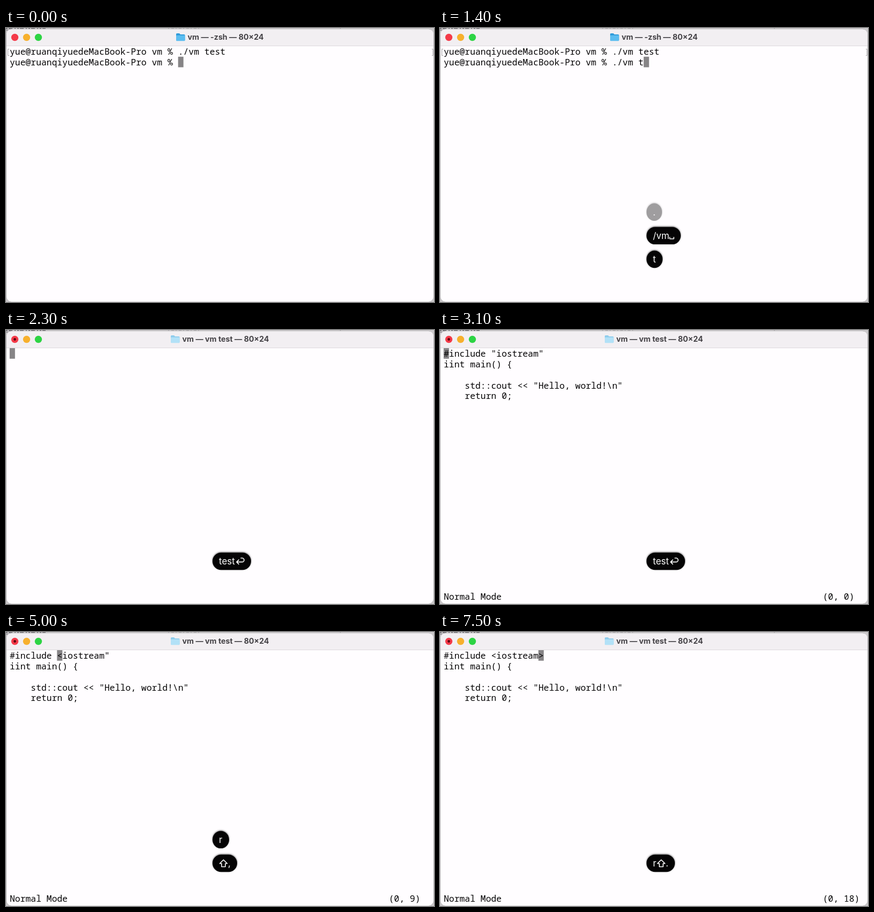
Write an HTML page that moves like this. It is 800 px wide and 513 px high and loops after 8000 ms.

```html
<!DOCTYPE html>
<html lang="en">
<head>
<meta charset="utf-8">
<title>Terminal</title>
<style>
  html, body { margin: 0; width: 100%; height: 100%; overflow: hidden; background: #fffdff; }
  svg { display: block; width: 100%; height: 100%; }
  text { white-space: pre; }
  .term { font: 16.4px "Noto Sans Mono", monospace; fill: #050405; }
  .title { font: 700 14.25px Inter, sans-serif; fill: #444246; }
  .pill { filter: drop-shadow(0 -1px 1.8px rgba(0, 0, 0, .55)); }
  .pill rect { fill: #050405; }
  .pill text { font: 17px Inter, sans-serif; fill: #fff; }
  .pill path { fill: none; stroke: #fff; stroke-width: 1.6; stroke-linejoin: round; stroke-linecap: round; }
</style>
</head>
<body>
<svg viewBox="0 0 800 513">
  <rect width="800" height="513" fill="#cbc9cb"/>
  <path d="M0 1H74" stroke="#77757a" stroke-width="2" stroke-dasharray="3 2 7 4 2 3"/>
  <path d="M0 4H4" stroke="#99979b" stroke-width="2"/>
  <path d="M303 .8H362M624 .8H627" stroke="#a5a3a6" stroke-width="1.2" stroke-dasharray="2 4 5 3"/>
  <rect x=".5" y="2" width="799" height="511" rx="10" fill="#fffdff" stroke="#b3b1b3"/>
  <path d="M1 33V12Q1 2.5 10.5 2.5H789.5Q799 2.5 799 12V33Z" fill="#f2eff2"/>
  <path d="M1 33.5H799" stroke="#dddadd"/>
  <circle cx="16.5" cy="17.5" r="6.7" fill="#f43a49"/>
  <circle cx="38.5" cy="17.5" r="6.7" fill="#f7b02d"/>
  <circle cx="60.5" cy="17.5" r="6.7" fill="#2dd444"/>
  <g id="view"></g>
</svg>
<script>
const LOOP = 8000, LEFT = 7, TOP = 34, CELL = 9.84, ROW = 19.75;
const LAUNCH = 2100, OPEN = 3000, WORD = 3600, OPENING = 4700, LINE_END = 5900, CLOSING = 7500;
const PROMPT = 'yue@ruanqiyuedeMacBook-Pro vm % ', COMMAND = './vm test';
const LIFE = 1200, FADE = 100;

// One time per key; soft pills spend their first moment half shown.
const pills = [
  { keys: '.', times: [100], soft: 100 },
  { keys: '/vm␣', times: [600, 700, 800, 900] },
  { keys: 'test↩', times: [1400, 1500, 1600, 1700, 2000] },
  { keys: 'w', times: [3600], soft: 100 },
  { keys: 'r', times: [4400] },
  { keys: '⇧,', times: [4700, 4700] },
  { keys: '⇧4', times: [5900, 5900] },
  { keys: 'r⇧.', times: [7300, 7500, 7500] }
];
const commandTimes = pills.slice(0, 3).flatMap(p => p.times);

const advance = { '.': 5, ',': 5, '/': 5, v: 10, m: 15, t: 6, e: 10, s: 9, r: 7, w: 14, 4: 11, '␣': 10, '↩': 17, '⇧': 17 };
const symbols = {
  '␣': 'M1.5-3V0H9V-3',
  '↩': 'M10-12H12.3A3.7 3.7 0 0 1 12.3-4.6H2M6-8.6L2-4.6L6-.6',
  '⇧': 'M8.5-12.5L1.5-5.5H5V.5H12V-5.5H15.5Z'
};

const view = document.getElementById('view');
const escape = s => s.replace(/&/g, '&amp;').replace(/</g, '&lt;');
const widthOf = s => [...s].reduce((sum, c) => sum + advance[c], 0);
const countBy = (times, t) => times.filter(x => x <= t).length;

const line = (s, row, col = 0) =>
  `<text class="term" x="${LEFT + col * CELL}" y="${TOP + row * ROW + 16.3}">${escape(s)}</text>`;
const cursor = (row, col) =>
  `<rect x="${LEFT + col * CELL - .2}" y="${TOP + row * ROW}" width="10" height="19.75" fill="#868486"/>`;

function titleBar(running) {
  const x = running ? 308 : 318;
  const [back, front] = running ? ['#8fcdec', '#b2e1f7'] : ['#2f9bda', '#5bbdf0'];
  const dot = running ? '<circle cx="16.5" cy="17.5" r="2.4" fill="#5c0510"/>' : '';
  return `${dot}<path d="M${x} 23V11.5Q${x} 10 ${x + 1.5} 10H${x + 6}L${x + 8} 12H${x + 15}Q${x + 16.5} 12 ${x + 16.5} 13.5V23Z" fill="${back}"/>
    <rect x="${x}" y="13.7" width="16.5" height="10.6" rx="1.3" fill="${front}"/>
    <text class="title" x="${x + 21.5}" y="22">vm — ${running ? 'vm test' : '-zsh'} — 80×24</text>`;
}

function shell(t) {
  const typed = COMMAND.slice(0, countBy(commandTimes, t));
  const marks = '<path d="M6 39.5H3.5V51.5H6M796 39.5H798V51.5H796" fill="none" stroke="#a3a1a4"/>';
  return marks + cursor(1, PROMPT.length + typed.length) + line(PROMPT + COMMAND, 0) + line(PROMPT + typed, 1);
}

function editor(t) {
  if (t < OPEN) return cursor(0, 0);
  const col = t < WORD ? 0 : t < LINE_END ? 9 : 18;
  const open = t < OPENING ? '"' : '<', close = t < CLOSING ? '"' : '>';
  const code = [`#include ${open}iostream${close}`, 'iint main() {', '', '    std::cout << "Hello, world!\\n"', '    return 0;'];
  return cursor(0, col) + code.map((s, i) => line(s, i)).join('') +
    line('Normal Mode', 23) + line(`(0, ${col})`, 23, 72);
}

function pill({ keys, times, soft = 0 }, t) {
  const start = times[0], count = countBy(times, t);
  if (!count) return '';
  const age = t - times[count - 1] - (count === 1 ? soft : 0);
  if (age >= LIFE + FADE) return '';
  const opacity = t < start + soft ? .5 : age >= LIFE ? .38 : 1;
  const slot = pills.filter(p => p.times[0] > start && p.times[0] <= t).length;
  const shown = keys.slice(0, count);
  let x = 12, glyphs = '';
  for (const run of shown.match(/[␣↩⇧]|[^␣↩⇧]+/g)) {
    glyphs += symbols[run]
      ? `<path transform="translate(${x} 22.3)" d="${symbols[run]}"/>`
      : `<text x="${x}" y="22.3">${run}</text>`;
    x += widthOf(run);
  }
  return `<g class="pill" opacity="${opacity}" transform="translate(386 ${416.7 - slot * 44.2})">
    <rect width="${x + 12}" height="32.6" rx="16"/>${glyphs}</g>`;
}

let last = '';
function render(t) {
  const running = t >= LAUNCH;
  const html = titleBar(running) + (running ? editor(t) : shell(t)) + pills.map(p => pill(p, t)).join('');
  if (html !== last) view.innerHTML = last = html;
}

const begin = performance.now();
function tick() {
  render((performance.now() - begin) % LOOP);
  requestAnimationFrame(tick);
}
tick();
</script>
</body>
</html>
```
